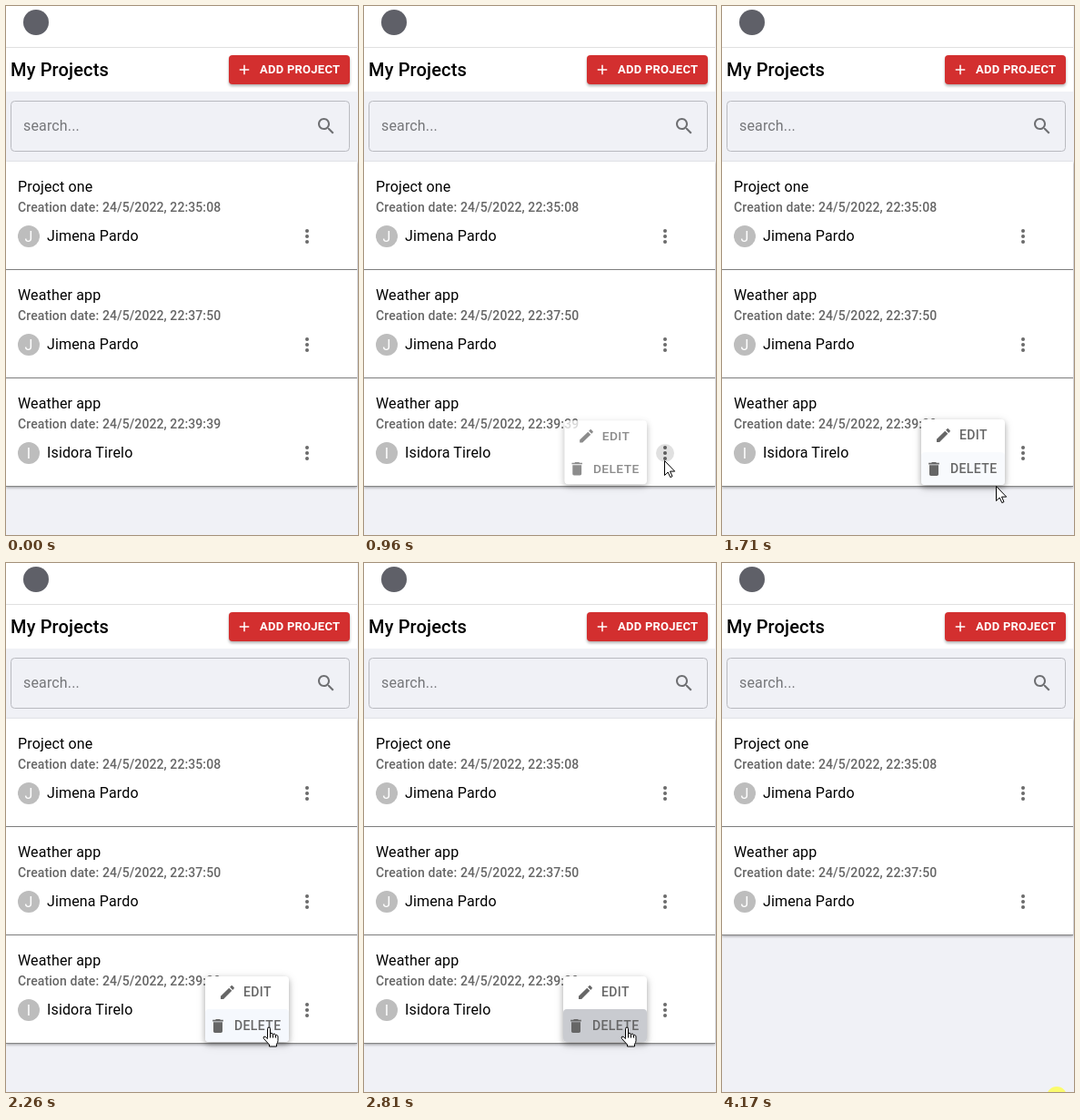
An HTML page for the animation above (4230 ms loop, 387x581 px).

```html
<!DOCTYPE html>
<html lang="en">
<head>
<meta charset="utf-8">
<title>My Projects</title>
<style>
  html, body { margin: 0; width: 100%; height: 100%; overflow: hidden; background: #f0f1f6; }
  svg { display: block; font: 400 16px Roboto, sans-serif; letter-spacing: .15px; }
  .head { font-size: 20px; font-weight: 500; }
  .date { font-size: 14px; font-weight: 500; letter-spacing: .1px; fill: #666; }
  .add { font-size: 13px; font-weight: 700; letter-spacing: .25px; fill: #fff; }
  .item { font-size: 14px; font-weight: 500; letter-spacing: .4px; }
  .card { fill: #fff; filter: drop-shadow(0 1px 1.5px rgba(0,0,0,.35)); }
  .red { fill: #d32f2f; filter: drop-shadow(0 2px 1.5px rgba(0,0,0,.3)); }
  .paper { fill: #fff; filter: drop-shadow(0 3px 3px rgba(0,0,0,.22)) drop-shadow(0 2px 5px rgba(0,0,0,.16)); }
  .pointer { fill: #fff; stroke: #000; stroke-linejoin: round; }
</style>
</head>
<body>
<svg id="stage" width="387" height="581" viewBox="0 0 387 581">
  <rect width="386" height="94" fill="#fff"/>
  <rect y="45" width="386" height="1" fill="#e0e0e0"/>
  <circle cx="33" cy="18" r="14" fill="#5f6068"/>
  <text class="head" x="5" y="77">My Projects</text>
  <rect class="red" x="245" y="54" width="133" height="32" rx="4"/>
  <path transform="translate(253 61) scale(.75)" fill="#fff" d="M19 13h-6v6h-2v-6H5v-2h6V5h2v6h6v2z"/>
  <text class="add" x="279" y="74">ADD PROJECT</text>

  <rect x="5.5" y="104.5" width="372" height="55" rx="4" fill="none" stroke="#b9bac0"/>
  <text x="19" y="137" fill="#757679">search...</text>
  <path transform="translate(340 120)" fill="#6e6f72" d="M15.5 14h-.79l-.28-.27C15.41 12.59 16 11.11 16 9.5 16 5.91 13.09 3 9.5 3S3 5.91 3 9.5 5.91 16 9.5 16c1.61 0 3.09-.59 4.23-1.57l.27.28v.79l5 4.99L20.49 19l-4.99-5zm-6 0C7.01 14 5 11.99 5 9.5S7.01 5 9.5 5 14 7.01 14 9.5 11.99 14 9.5 14z"/>

  <g id="rows"></g>
  <circle id="press" cx="331" cy="491" r="10"/>

  <clipPath id="button"><rect x="219" y="490" width="92" height="36" rx="4"/></clipPath>
  <g id="menu" fill="#666">
    <rect class="paper" x="219" y="454" width="92" height="72" rx="4"/>
    <g clip-path="url(#button)">
      <rect id="hover" x="219" y="490" width="92" height="36" fill="#f5f8fd"/>
      <circle id="ripple" cx="289" cy="512" fill="#000" fill-opacity=".18"/>
    </g>
    <path transform="translate(233.5 461.5) scale(.833)" d="M3 17.25V21h3.75L17.81 9.94l-3.75-3.75L3 17.25zM20.71 7.04c.39-.39.39-1.02 0-1.41l-2.34-2.34c-.39-.39-1.02-.39-1.41 0l-1.83 1.83 3.75 3.75 1.83-1.83z"/>
    <text class="item" x="261" y="476">EDIT</text>
    <path transform="translate(223 498.5) scale(.833)" d="M6 19c0 1.1.9 2 2 2h8c1.1 0 2-.9 2-2V7H6v12zM19 4h-3.5l-1-1h-5l-1 1H5v2h14V4z"/>
    <text class="item" x="251" y="513">DELETE</text>
  </g>

  <circle id="glow" cx="368" cy="586" r="11" fill="#fbfb6c"/>
  <path id="arrow" class="pointer" d="M.5 .5V16.5L4.2 13 6.8 18.6 9 17.6 6.5 12.1H11.7Z"/>
  <path id="hand" class="pointer" transform="translate(282.5 509.5)" d="M5 12V2Q5 .5 6.5 .5T8 2V7.5Q8.3 6.6 9.5 6.8T11 8.3Q11.5 7.3 12.6 7.6T14 9.2Q14.6 8.5 15.5 9T16.5 10.5V15Q16.5 17 15 19V21.5H7V19.5L1 13Q0 11.3 1.2 10.6T5 13ZM8 7.5V12M11 8.3V12M14 9.2V12"/>
</svg>
<script>
const LOOP = 4230, START = 190, STEP = 68.6;
const $ = id => document.getElementById(id);
const set = (id, attrs) => { for (const a in attrs) $(id).setAttribute(a, attrs[a]); };
const show = (id, on) => { $(id).style.display = on ? '' : 'none'; };

const projects = [
  ['Project one', '22:35:08', 'Jimena Pardo'],
  ['Weather app', '22:37:50', 'Jimena Pardo'],
  ['Weather app', '22:39:39', 'Isidora Tirelo']
];
$('rows').innerHTML = projects.map(([title, time, owner], i) => `
  <g id="row${i}" transform="translate(0 ${i * 119})">
    <rect class="card" y="171" width="386" height="119"/>
    <rect y="289" width="386" height="1" fill="#858585"/>
    <text x="13" y="204">${title}</text>
    <text class="date" x="13" y="226">Creation date: 24/5/2022, ${time}</text>
    <circle cx="25" cy="253" r="12" fill="#bdbdbd"/>
    <text x="25" y="259" text-anchor="middle" fill="#fff">${owner[0]}</text>
    <text x="45" y="258">${owner}</text>
    ${[247, 253, 259].map(y => `<circle cx="331" cy="${y}" r="2" fill="#6b6b6b"/>`).join('')}
  </g>`).join('');

// Pointer tip as [step, x, y]; each place holds until the next one
const path = [
  [0, 349, 562], [1, 340, 546], [2, 329, 530], [3, 321, 515], [4, 318, 506], [5, 325, 501], [6, 330, 499],
  [18, 326, 506], [19, 313, 521], [20, 298, 530], [21, 295, 529], [22, 301, 527],
  [24, 294, 522], [25, 285, 515], [26, 291, 520], [39, 291, 519],
  [46, 291, 423], [47, 289, 374], [48, 301, 350], [49, 320, 365],
  [50, 338, 405], [51, 352, 455], [52, 362, 510], [53, 368, 561]
];

function draw(now) {
  const k = Math.floor((now % LOOP - START) / STEP);
  const within = (a, b) => k >= a && k < b;

  show('row2', k < 39);
  set('press', { opacity: within(8, 13) ? [.06, .12, .12, .12, .05][k - 8] : 0 });

  const open = Math.max(0, Math.min(1, (k - 8) / 4));
  const s = 1 - .25 * (1 - open) ** 2;
  show('menu', within(9, 39));
  set('menu', { opacity: open, transform: `translate(311 498) scale(${s} ${s * s}) translate(-311 -498)` });
  set('hover', { opacity: k < 20 ? 0 : k < 24 ? .7 : 1 });
  const grow = Math.max(0, Math.min(1, (k - 30) / 8));
  set('ripple', { r: 78 * grow, opacity: Math.min(1, grow * 1.5) });

  const onButton = within(28, 39);
  const tip = path.filter(p => p[0] <= k).pop();
  show('hand', onButton);
  show('arrow', within(0, 54) && !onButton);
  if (tip) set('arrow', { transform: `translate(${tip[1]} ${tip[2]})` });
  show('glow', k >= 58);
}

let begin;
function tick(now) {
  begin ??= now;
  draw(now - begin);
  requestAnimationFrame(tick);
}
draw(0);
requestAnimationFrame(tick);
</script>
</body>
</html>
```
